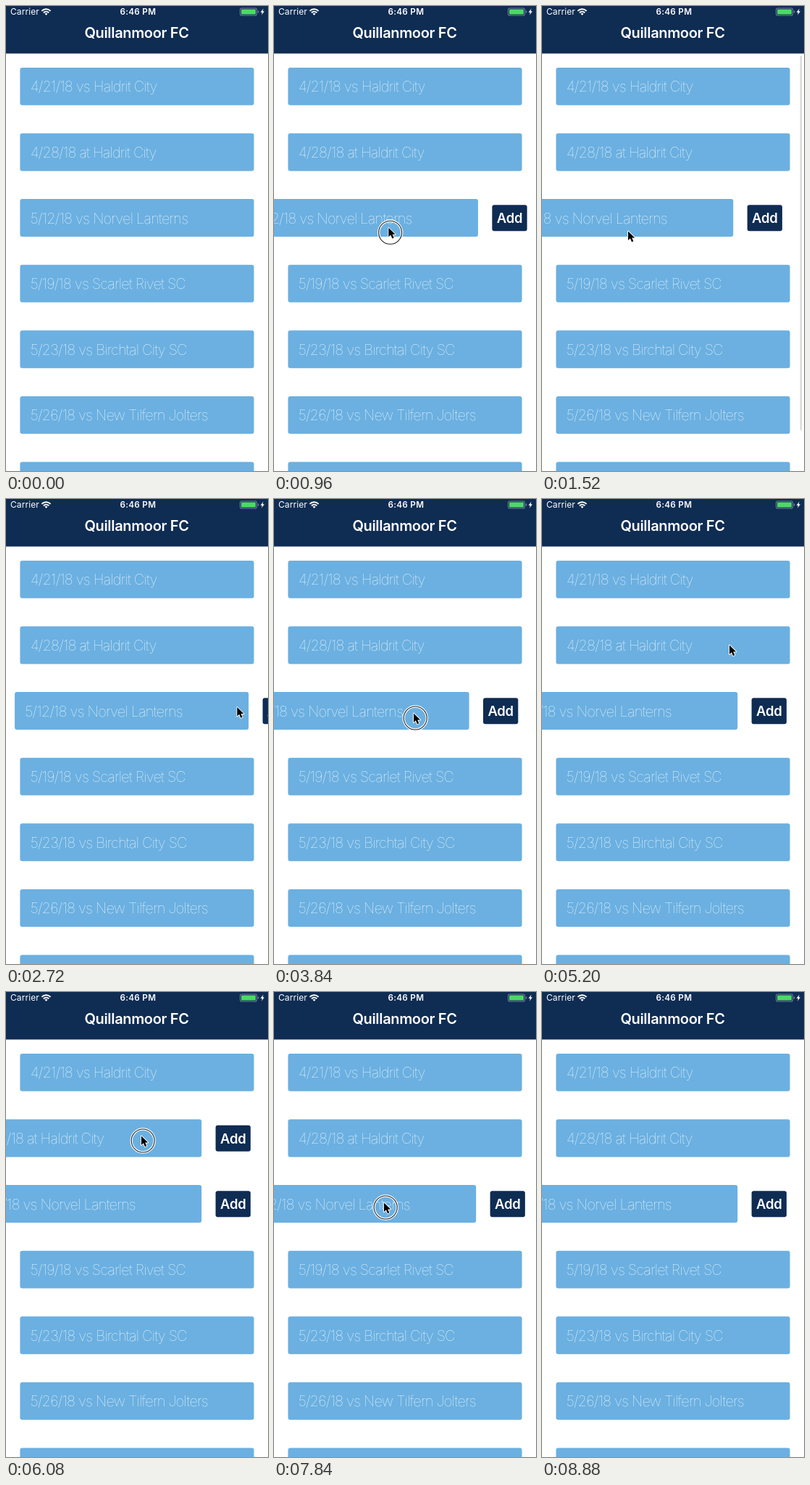
An HTML page with a canvas that plays this animation: 362 by 641 pixels, repeating every 9200 ms.

```html
<!DOCTYPE html>
<html lang="en">
<head>
<meta charset="utf-8">
<title>Match schedule</title>
<style>
html, body { margin: 0; width: 100%; height: 100%; overflow: hidden; background: #fff; }
canvas { display: block; width: 362px; height: 641px; }
</style>
</head>
<body>
<canvas id="stage"></canvas>
<script>
const W = 362, H = 641, LOOP = 9200, STEP = 80;
const NAVY = '#0f2c53', BLUE = '#6bb0e1', FONT = 'Inter, Roboto, sans-serif';
const OPEN = -72.4, DRAG = 560, SETTLE = 600;
const canvas = document.getElementById('stage');
const ctx = canvas.getContext('2d');
const dpr = window.devicePixelRatio || 1;
canvas.width = W * dpr;
canvas.height = H * dpr;

const games = [
  '4/21/18 vs Haldrit City',
  '4/28/18 at Haldrit City',
  '5/12/18 vs Norvel Lanterns',
  '5/19/18 vs Scarlet Rivet SC',
  '5/23/18 vs Birchtal City SC',
  '5/26/18 vs New Tilfern Jolters',
  ''
];

// A row follows the pointer while it is held, then settles at its rest position.
const gestures = [
  { row: 2, down: 640, up: 1280, from: [218, 297], to: [118, 309], rest: OPEN, pull: 3 },
  { row: 2, down: 2240, up: 2400, from: [322, 285], to: [322, 285], rest: 0 },
  { row: 2, down: 3280, up: 4240, from: [265, 294], to: [192, 294], end: [194, 302], rest: OPEN, pull: 14 },
  { row: 1, down: 5280, up: 5680, from: [258, 200], to: [186, 197], rest: OPEN },
  { row: 1, down: 6080, up: 6480, from: [186, 197], to: [258, 200], rest: 0 },
  { row: 2, down: 7120, up: 7920, from: [142, 291], to: [151, 289], rest: OPEN }
];
const enter = [160, 196, 436];
const leave = [[8400, 47, 376], [8560, 24, 510], [8640, 24, 510], [8800, 92, 615]];

// The pointer arrives a little before pressing and lingers after releasing.
const path = [
  enter,
  ...gestures.flatMap(({ down, up, from, to, end = to }) => [
    [down - 120, ...from], [down, ...from],
    [Math.min(down + DRAG, up), ...to], [up, ...end], [up + 240, ...end]
  ]),
  ...leave
];

const clamp = p => Math.min(1, Math.max(0, p));
const smooth = p => p * p * (3 - 2 * p);
const easeOut = p => 1 - (1 - p) ** 3;
const mix = (a, b, p) => a + (b - a) * p;

function pointerAt(t) {
  const n = path.findIndex(key => key[0] > t);
  if (n < 0) return path[path.length - 1].slice(1);
  const [t0, x0, y0] = path[Math.max(0, n - 1)];
  const [t1, x1, y1] = path[n];
  const p = smooth(clamp((t - t0) / (t1 - t0)));
  return [mix(x0, x1, p), mix(y0, y1, p)];
}

function rowShift(row, t) {
  let x = 0;
  for (const g of gestures) {
    if (g.row !== row || t < g.down) continue;
    x += pointerAt(Math.min(t, g.up))[0] - g.from[0];
    x = mix(x, g.rest, easeOut(clamp((t - g.up) / SETTLE)));
  }
  return x;
}

// Pulling the list past its top shows the scroll bar, longer for a larger pull.
function scrollAt(t) {
  let pull = 0, bar = 0;
  for (const g of gestures.filter(g => g.pull)) {
    const dt = t - g.up;
    pull += g.pull * smooth(clamp((dt + 280) / 160)) * (1 - easeOut(clamp((dt + 120) / 320)));
    if (dt > -280) bar += .35 * (1 - clamp((dt - 60 - 14 * g.pull) / 240));
  }
  return { pull, bar };
}

function box(x, y, w, h, r, fill) {
  ctx.beginPath();
  ctx.roundRect(x, y, w, h, r);
  ctx.fillStyle = fill;
  ctx.fill();
}

function ring(x, y, r, color, width) {
  ctx.beginPath();
  ctx.arc(x, y, r, 0, Math.PI * 2);
  ctx.strokeStyle = color;
  ctx.lineWidth = width;
  ctx.stroke();
}

function polygon(points, fill, outline) {
  ctx.beginPath();
  points.forEach(([x, y]) => ctx.lineTo(x, y));
  ctx.closePath();
  if (outline) {
    ctx.strokeStyle = outline;
    ctx.lineWidth = 1.8;
    ctx.lineJoin = 'round';
    ctx.stroke();
  }
  ctx.fillStyle = fill;
  ctx.fill();
}

function text(str, x, y, size, weight, { align = 'left', spacing = 0 } = {}) {
  ctx.font = `${weight} ${size}px ${FONT}`;
  ctx.letterSpacing = spacing + 'px';
  ctx.textAlign = align;
  ctx.fillStyle = '#fff';
  ctx.fillText(str, x, y);
}

function drawRow(label, i, shift, pull) {
  const x = 19.4 + shift, y = 84.9 + i * 90.6 + pull;
  box(x, y, 323.2, 51.9, 3, BLUE);
  text(label, x + 14.3, y + 33.5, 20, 100, { spacing: -.8 });
  if (shift > -.5) return;
  box(x + 342.6, y + 8.2, 48.3, 36, 3, NAVY);
  text('Add', x + 366.7, y + 33, 18.5, 600, { align: 'center', spacing: -.3 });
}

function drawWifi(x, y) {
  const from = -Math.PI * .76, to = -Math.PI * .24;
  ctx.strokeStyle = ctx.fillStyle = '#fff';
  ctx.lineWidth = 1.9;
  for (const r of [5, 8.4]) {
    ctx.beginPath();
    ctx.arc(x, y, r, from, to);
    ctx.stroke();
  }
  ctx.beginPath();
  ctx.moveTo(x, y);
  ctx.arc(x, y, 2.8, from, to);
  ctx.fill();
}

function drawBattery() {
  const shell = '#71809a';
  box(323, 2.5, 24, 11, 2.8, shell);
  box(324, 3.5, 22, 9, 2, NAVY);
  box(325, 4.5, 20, 7, 1.2, '#4cd964');
  box(347.8, 6.3, 1.4, 3.4, .7, shell);
  polygon([[355.6, 3.5], [351.6, 8.7], [354, 8.7], [353, 12.6], [357, 7.3], [354.6, 7.3]], '#fff');
}

function drawHeader() {
  box(0, 0, W, 65.6, 0, NAVY);
  text('Carrier', 6, 12.2, 12, 400, { spacing: .1 });
  drawWifi(55.5, 12.7);
  text('6:46 PM', 182.3, 12.2, 11.7, 600, { align: 'center', spacing: .3 });
  drawBattery();
  text('Quillanmoor FC', 180.5, 44, 20, 600, { align: 'center', spacing: -.35 });
}

function drawPointer([x, y], pressed) {
  if (pressed) {
    ring(x + 3.2, y + 8, 16, '#fff', 3.4);
    ring(x + 3.2, y + 8, 16, '#222', 1.1);
  }
  const arrow = [[1, 1.5], [1, 14], [3.9, 11.3], [6, 16.2], [8.3, 15.2], [6.2, 10.5], [10.2, 10.5]];
  polygon(arrow.map(([a, b]) => [x + a, y + b]), '#000', '#fff');
}

function draw(t) {
  ctx.setTransform(dpr, 0, 0, dpr, 0, 0);
  box(0, 0, W, H, 0, '#fff');
  const { pull, bar } = scrollAt(t);
  games.forEach((label, i) => drawRow(label, i, rowShift(i, t), pull));
  if (bar > 0) box(356.6, 68.5, 2.4, 516.5 - pull, 1.2, `rgba(0,0,0,${bar})`);
  drawHeader();
  if (t >= enter[0] && t < 8880) {
    drawPointer(pointerAt(t), gestures.some(g => t >= g.down && t < g.up));
  }
}

const start = performance.now();
function frame() {
  const t = (performance.now() - start) % LOOP;
  draw(Math.floor(t / STEP) * STEP);
  requestAnimationFrame(frame);
}
frame();
</script>
</body>
</html>
```
